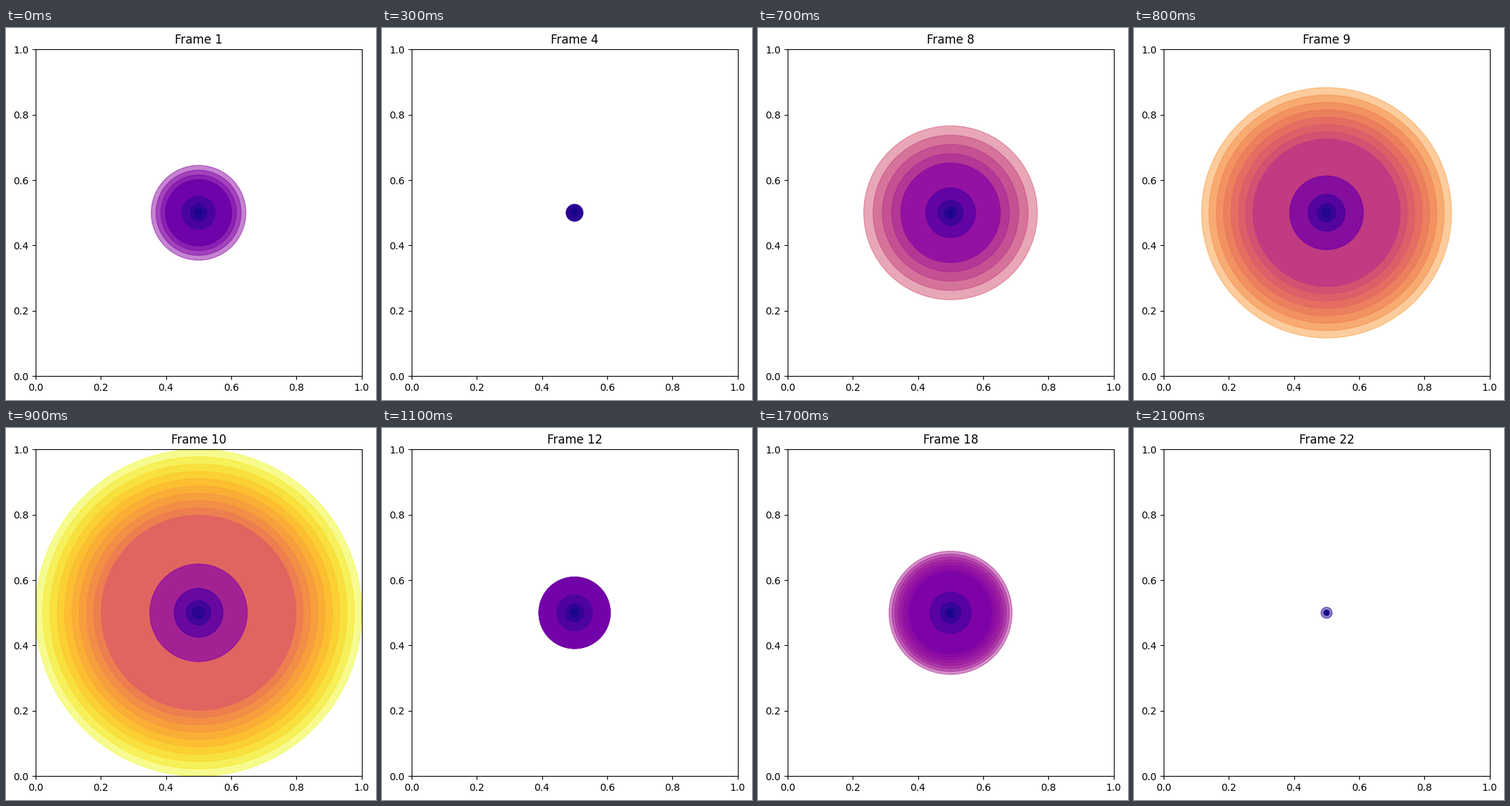
These frames come from a looping animation (524 by 526 pixels, 2200 ms). A matplotlib script:

```python
import matplotlib.pyplot as plt
import numpy as np
from matplotlib.animation import FuncAnimation
from matplotlib.patches import Circle

W, H, DPI = 524, 526, 100
FRAMES, INTERVAL = 22, 100
LEFT, BOTTOM, SIDE = 41.72, 33.72, 462

# Pulse: key steps with the shell's outer radius, inner radius and ring count
STEPS = [0, 3, 7, 9, 11, 17, 21]
OUTER = [.145, .026, .266, .5, .109, .1885, .017]
INNER = [.101, .023, .152, .298, .109, .126, .008]
RINGS = [4, 6, 5, 10, 4, 8, 2]


def radii_at(i):
    """Even shell, solid body, then a core that keeps halving."""
    outer, inner, n = (np.interp(i, STEPS, row)
                       for row in (OUTER, INNER, RINGS))
    shell = np.linspace(outer, inner, round(n))
    body = np.full(2, inner)
    core = np.repeat(inner * .5 ** np.arange(1, 5), 2)
    return np.concatenate([shell, body, core])


fig = plt.figure(figsize=(W / DPI, H / DPI), dpi=DPI, facecolor="white")
ax = fig.add_axes([LEFT / W, BOTTOM / H, SIDE / W, SIDE / H])
ax.set(xlim=(0, 1), ylim=(0, 1))
title = ax.set_title("Frame 1")


def update(i):
    title.set_text(f"Frame {i + 1}")
    for old in list(ax.patches):
        old.remove()
    for r in radii_at(i):
        color = plt.cm.plasma(float(2 * r))
        ax.add_patch(Circle((.5, .5), r, color=color, alpha=.5, lw=1))
    return [title, *ax.patches]


anim = FuncAnimation(fig, update, frames=FRAMES, interval=INTERVAL,
                     repeat=True, repeat_delay=0, blit=False)
plt.show()
```
